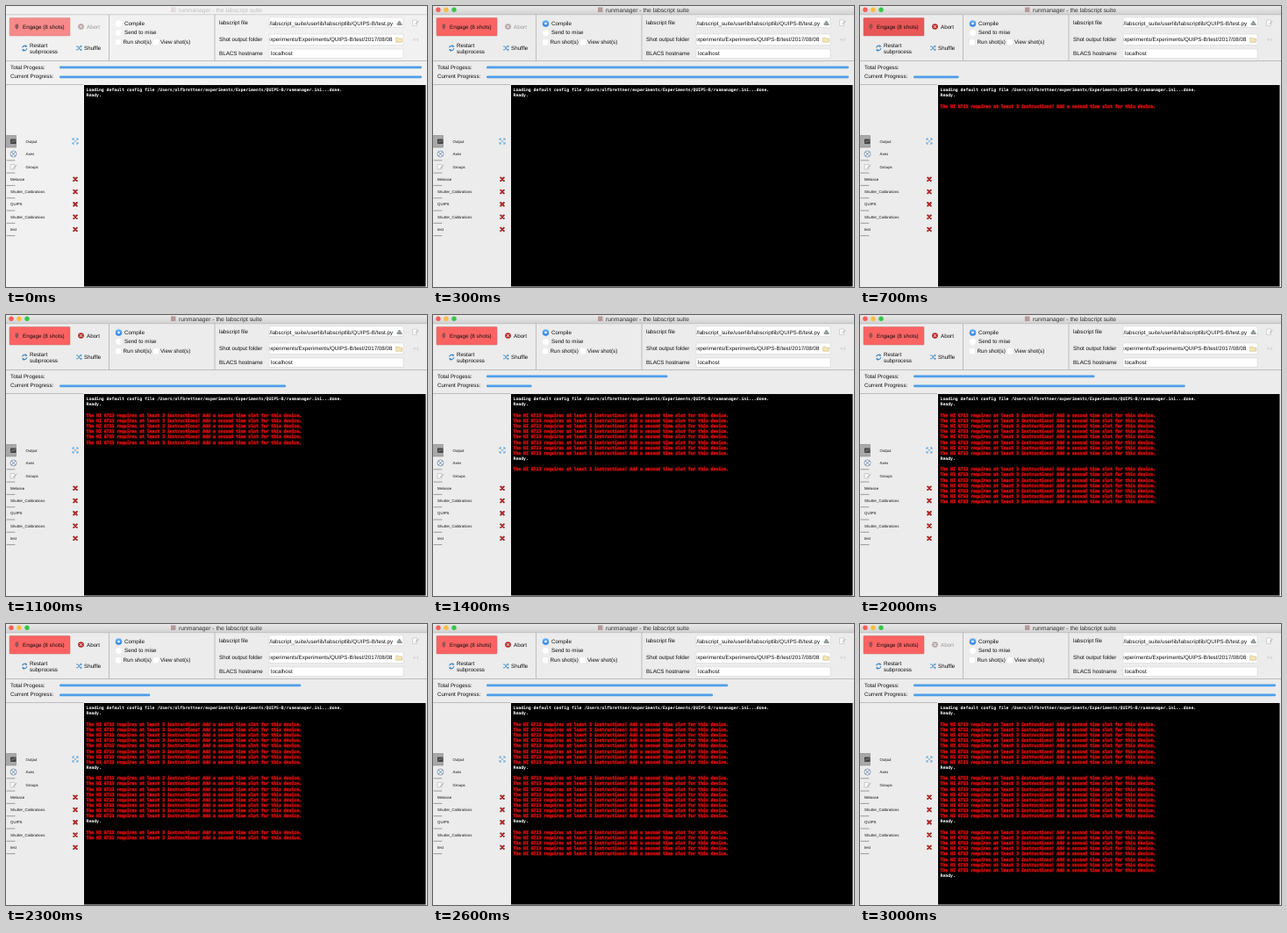
Animation, 480 px wide and 320 px high, one loop 3.1 s. Source, as an HTML page:

```html
<!DOCTYPE html>
<html lang="en">
<head>
<meta charset="utf-8">
<title>runmanager</title>
<style>
html, body { margin: 0; width: 100%; height: 100%; overflow: hidden; background: #ececec; }
svg { display: block; width: 480px; height: 320px; }
text { font: 6.25px "Liberation Sans", Arial, sans-serif; fill: #111; white-space: pre; text-rendering: geometricPrecision; }
.side { font-size: 4.35px; }
.title { font-size: 6.75px; }
.log { font: bold 4.805px "DejaVu Sans Mono", monospace; fill: #fff; }
.error { fill: #f01414; stroke: #5c0000; stroke-width: 1.5px; stroke-linejoin: round; paint-order: stroke; }
</style>
</head>
<body>
<svg id="stage" viewBox="0 0 480 320" xmlns="http://www.w3.org/2000/svg">
  <defs>
    <linearGradient id="bar" x2="0" y2="1"><stop stop-color="#e9e9e9"/><stop offset="1" stop-color="#d1d1d1"/></linearGradient>
    <linearGradient id="blue" x2="0" y2="1"><stop stop-color="#6bb5f7"/><stop offset="1" stop-color="#2f7fe0"/></linearGradient>
    <clipPath id="field"><rect x="300.5" y="30" width="142" height="17"/></clipPath>
  </defs>
</svg>
<script>
const NS = "http://www.w3.org/2000/svg";
const stage = document.getElementById("stage");
const LOOP = 3100, STEP = 100;
const BAR_X = 61, BAR_W = 413;
const LINE = 6.15, LOG_Y = 97.3;
const ERROR = "The NI 6713 requires at least 3 instructions! Add a second time slot for this device.";

function add(tag, attrs, parent = stage) {
  const el = document.createElementNS(NS, tag);
  for (const key in attrs) el.setAttribute(key, attrs[key]);
  parent.appendChild(el);
  return el;
}
const rect = (x, y, width, height, fill, more) => add("rect", { x, y, width, height, fill, ...more });
const dot = (cx, cy, r, fill, more) => add("circle", { cx, cy, r, fill, ...more });
const path = (d, stroke, width = 1, fill = "none") =>
  add("path", { d, stroke, fill, "stroke-width": width, "stroke-linecap": "round", "stroke-linejoin": "round" });
function label(x, y, str, cls = "", more = {}) {
  const el = add("text", { x, y, class: cls, ...more });
  el.textContent = str;
  return el;
}
const set = (el, key, value) => el.setAttribute(key, value);

// Window frame
const back = rect(0, 0, 480, 320, "#ececec");
const head = rect(0, 0, 480, 10, "url(#bar)");
const lights = ["#fc5b57", "#fdbc40", "#34c84a"].map((c, i) => dot(6 + i * 9, 4.2, 2.7, c));
const appIcon = rect(188, 1.5, 5.5, 5.5, "#b59a9a");
const title = label(197, 6.7, "runmanager - the labscript suite", "title");
path("M0 9.8H480", "#b5b5b5", .6);
path("M117.5 10V62M238 10V62M0 62.5H480M0 89.5H88", "#b2b2b2", .8);

// Run buttons
const engage = rect(4, 13.5, 69, 20.5, "#fa6464", { stroke: "#c96a6a", "stroke-width": .5, rx: .8 });
path("M11 21.5L13.5 20.5L14 24L12.5 26.5L11 25Z", "#8a4545", .5, "#8d5a5a");
label(19, 25.7, "Engage (8 shots)");
const stop = dot(85.5, 23.5, 3.3, "#b32626");
path("M84.2 22.2L86.8 24.8M86.8 22.2L84.2 24.8", "#fff", .9);
const abort = label(92, 25.7, "Abort");
path("M18.8 47A2.8 2.8 0 0 1 23 45.8M23.7 48.6A2.8 2.8 0 0 1 19.5 50.2", "#3f86bd", 1.1);
path("M22.5 44.4L24.2 46.2L22.2 46.8ZM20 51.6L18.1 49.8L20.2 49.2Z", "#3f86bd", .3, "#3f86bd");
label(27, 46.6, "Restart");
label(27, 53.7, "subprocess");
path("M80.3 46H82L84.3 49.8H85.5M80.3 49.8H82L84.3 46H85.5", "#4a8fc4", .9);
path("M85.2 44.9L86.7 46L85.2 47.1ZM85.2 48.7L86.7 49.8L85.2 50.9Z", "#4a8fc4", .3, "#4a8fc4");
label(89, 50.2, "Shuffle");

// Options
const radio = dot(128.5, 20, 3.8, "url(#blue)");
const pip = dot(128.5, 20, 1.3, "#fff");
label(135, 22, "Compile");
dot(128.5, 30.5, 3.4, "#fff");
label(135, 31.8, "Send to mise");
rect(125, 38.3, 6, 6, "#fff", { rx: 1 });
label(133.5, 43, "Run shot(s)");
rect(168, 38.3, 6, 6, "#fff", { rx: 1 });
label(176, 43, "View shot(s)");

// Path fields
label(243, 20.6, "labscript file");
label(243, 40.2, "Shot output folder");
label(243, 56.4, "BLACS hostname");
const edge = { stroke: "#c8c8c8", "stroke-width": .4 };
rect(300, 13, 153, 11.5, "#fff", edge);
rect(300, 32, 153, 12.5, "#fff", edge);
rect(300, 49, 153, 10.5, "#fff", edge);
label(300.5, 21.6, "/labscript_suite/userlib/labscriptlib/QUIPS-B/test.py");
label(440.5, 40.2, "experiments/Experiments/QUIPS-B/test/2017/08/08", "", { "text-anchor": "end", "clip-path": "url(#field)" });
label(302, 56.4, "localhost");
path("M446 20.5L448.5 17L451.5 21.5H446.5Z", "#77807a", .8, "#9aa39a");
path("M445 36.2H447.5L448.5 37.1H451.5V41.2H445Z", "#cbb985", .6, "#f4e6b4");
path("M464 16H468.5V22.5H464Z", "#c0c0c0", .6, "#fafafa");
path("M467 20.5L470 17.5", "#a0a0a0", .9);
path("M464.5 38.2H468.5M466 36.7L464.5 38.2L466 39.7M469.5 36.7V40", "#cdcdcd", .7);

// Progress
label(5, 71.8, "Total Progess:");
label(5, 82, "Current Progress:");
const meter = y => rect(BAR_X, y, 0, 2.8, "#4f9fe9", { rx: 1.2 });
const total = meter(68.4), current = meter(79.4);

// Side tabs
rect(0, 147.5, 11.5, 13.5, "#a9a9a9");
path("M0 147.5H11.5V161H0", "#777", .5);
rect(5, 151.5, 6.5, 5.5, "#444", { rx: .6 });
path("M6 155.5L8 153.5L9 154.5L10.5 152.8", "#bbb", .6);
dot(8.5, 168.5, 3.5, "#f4f7fb", { stroke: "#64809e", "stroke-width": .7 });
path("M6.5 166.5L10.5 170.5M10.5 166.5L6.5 170.5", "#4c6e94", .8);
path("M5.5 180.5H10V186H5.5Z", "#b4b4b4", .6, "#fafafa");
path("M8 185L12 181.5", "#8c9aa8", .8);
["Output", "Axes", "Groups"].forEach((s, i) => label(22.5, 155.7 + i * 14.4, s, "side"));
path("M77.2 152.2L80.8 155.8M80.8 152.2L77.2 155.8", "#8fb9da", .8);
path("M76 152.5V151H77.5M80.5 151H82V152.5M82 155.5V157H80.5M77.5 157H76V155.5", "#569dd3", 1);
["Melasse", "Shutter_Calibrations", "QUIPS", "Shutter_Calibrations", "test"].forEach((s, i) => {
  const y = 197.2 + i * 14.3;
  const cross = `M77.2 ${y - 1.8}L80.8 ${y + 1.8}M80.8 ${y - 1.8}L77.2 ${y + 1.8}`;
  label(5, y + 1.4, s, "side");
  path(cross, "#7e1b1b", 1.9);
  path(cross, "#c42a2a", 1.1);
});
for (let i = 0; i < 7; i++) path(`M1 ${175.8 + i * 14.3}H10`, "#777", .7);

// Console: greeting, then three runs of eight errors each
rect(89, 90, 389.5, 229.5, "#000");
const logLine = (row, str, kind = "") => label(91.5, LOG_Y + row * LINE, str, "log " + kind);
logLine(0, "Loading default config file /Users/olfbrettner/experiments/Experiments/QUIPS-B/runmanager.ini...done.");
logLine(1, "Ready.");

const runs = [
  { rows: [1, 2, 3, 5, 6, 7, 8], bar: [1, 2, 3, 4, 5, 6, 8], start: 7, ready: 13 },
  { rows: [1, 2, 3, 4, 5, 6, 7, 8], bar: [1, 2, 4.07, 4.1, 5, 5.5, 6, 8], start: 14, ready: 21 },
  { rows: [1, 2, 3, 4, 5, 6, 7, 8], bar: [1, 2, 3, 4, 5, 6, 7, 8], start: 22, ready: 30 }
];
runs.forEach((run, r) => {
  const top = 3 + r * 10;
  run.errors = Array.from({ length: 8 }, (_, i) => logLine(top + i, ERROR, "error"));
  run.done = logLine(top + 8, "Ready.");
});

const show = (el, on) => set(el, "visibility", on ? "visible" : "hidden");
const upTo = (list, k) => k < 0 ? 0 : list[Math.min(k, list.length - 1)];

function draw(ms) {
  const n = Math.floor(ms / STEP);
  const active = n > 0, busy = n >= 4 && n < 30;

  set(back, "fill", active ? "#ececec" : "#f1f1f1");
  set(head, "fill", active ? "url(#bar)" : "#f1f1f1");
  lights.forEach(el => show(el, active));
  set(appIcon, "opacity", active ? 1 : .25);
  title.style.fill = active ? "#333" : "#c0c0c0";
  set(radio, "fill", active ? "url(#blue)" : "#fff");
  show(pip, active);

  const pressed = [4, 5, 6, 7, 15, 16].includes(n);
  set(engage, "fill", !active ? "#f68a8a" : pressed ? "#e85757" : "#fb6363");
  set(engage, "stroke", active ? "#c96a6a" : "#d88a8a");
  set(stop, "fill", busy ? "#b32626" : "#b3a3a3");
  abort.style.fill = busy ? "#111" : "#999";

  let bar = n < 4 ? 8 : 0;
  for (const run of runs) {
    const k = n - run.start, rows = upTo(run.rows, k);
    run.errors.forEach((el, i) => show(el, i < rows));
    show(run.done, n >= run.ready);
    if (k >= 0) bar = upTo(run.bar, k);
  }
  const whole = n < 4 || n >= 30 ? 1 : n < 13 ? 0 : n < 21 ? 1 / 2 : 2 / 3;
  set(current, "width", BAR_W * bar / 8);
  set(total, "width", BAR_W * whole);
}

const begin = performance.now();
function tick() {
  draw((performance.now() - begin) % LOOP);
  requestAnimationFrame(tick);
}
draw(0);
requestAnimationFrame(tick);
</script>
</body>
</html>
```
